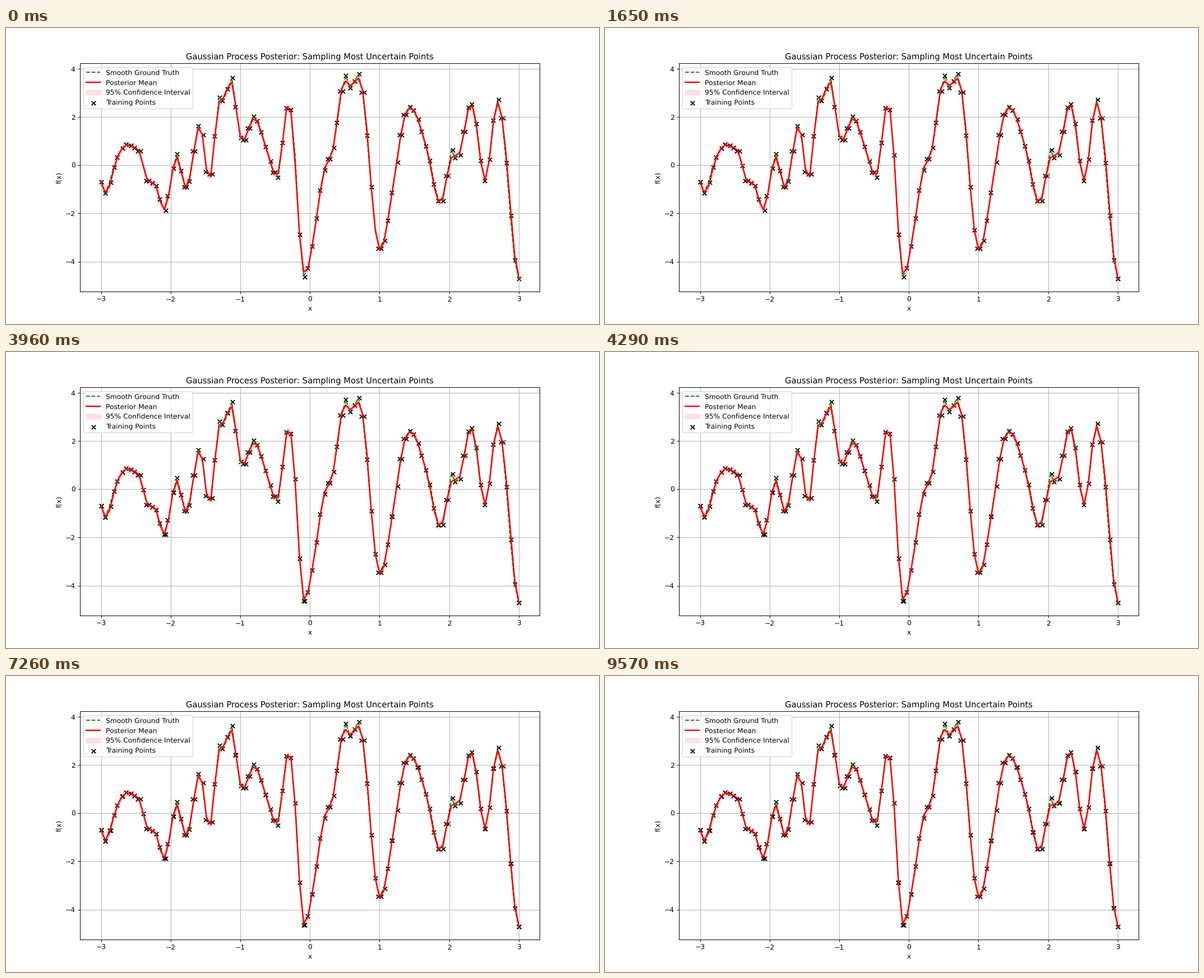
These frames come from a looping animation (1058x529 px, 9900 ms). A matplotlib script:

```python
import numpy as np
import matplotlib.pyplot as plt
from matplotlib.animation import FuncAnimation

FRAMES, INTERVAL = 30, 330
LENGTH, NOISE = 0.1, 0.01
COUNT = 100
GRID = np.linspace(-3, 3, COUNT)

# Turning points of the ground truth: grid step, value
KNOTS = np.array([
    (0, -0.69), (1, -1.15), (3, -0.08), (6, 0.86), (9, 0.60), (11, -0.63),
    (13, -0.84), (15, -1.88), (18, 0.47), (20, -0.90), (21, -0.67),
    (23, 1.64), (24, 1.26), (25, -0.28), (26, -0.37), (28, 2.83),
    (29, 2.69), (31, 3.63), (33, 1.14), (34, 1.06), (36, 2.03),
    (42, -0.49), (44, 2.38), (45, 2.30), (48, -4.64), (53, -0.19),
    (55, 0.73), (58, 3.72), (59, 3.21), (61, 3.79), (66, -3.45),
    (73, 2.43), (78, 0.19), (80, -1.47), (81, -1.47), (83, 0.63),
    (84, 0.31), (85, 0.43), (87, 2.41), (88, 2.55), (91, -0.63),
    (94, 2.73), (99, -4.71)])

# Grid steps with no known point at first, and those with one on each side
GAPS = {10, 46, 65}
PAIRS = {9, 11, 20, 22, 26, 34, 35, 41, 54, 57, 62, 66, 71, 72, 82, 86, 95}


def monotone_curve(x, kx, ky):
    """Cubic curve through the knots that is flat at each extremum."""
    h = np.diff(kx)
    d = np.diff(ky) / h
    slope = np.zeros(len(kx))
    slope[1:-1] = 2 * np.maximum(d[:-1] * d[1:], 0) / (d[:-1] + d[1:])
    i = np.clip(np.searchsorted(kx, x, side="right") - 1, 0, len(h) - 1)
    t = (x - kx[i]) / h[i]
    bend = slope[i] * (1 - t) - slope[i + 1] * t
    return (ky[i] + (ky[i + 1] - ky[i]) * t * t * (3 - 2 * t)
            + h[i] * t * (1 - t) * bend)


def kernel(a, b):
    return np.exp(-0.5 * ((a[:, None] - b[None, :]) / LENGTH) ** 2)


def position(steps):
    return -3 + steps * (GRID[1] - GRID[0])


def posterior(steps):
    x = position(steps)
    y = TRUTH[np.rint(steps).astype(int)]
    gain = np.linalg.solve(kernel(x, x) + NOISE * np.eye(len(x)),
                           kernel(x, GRID)).T
    var = 1 - np.sum(gain * kernel(GRID, x), axis=1)
    return x, y, gain @ y, np.sqrt(np.maximum(var, 0))


def first_points():
    jitter = np.random.default_rng(4).normal(0.05, 0.13, COUNT).clip(-0.4, 0.4)
    jitter[[0, -1]] = 0
    steps = []
    for k in range(COUNT):
        if k in PAIRS:
            steps += [k - 0.3, k + 0.3]
        elif k not in GAPS:
            steps.append(k + jitter[k])
    return np.array(steps)


def sample_history():
    """Add the most uncertain grid point before each new frame."""
    steps = first_points()
    history = [posterior(steps)]
    while len(history) < FRAMES:
        steps = np.append(steps, np.argmax(history[-1][3]))
        history.append(posterior(steps))
    return history


TRUTH = monotone_curve(np.arange(COUNT), KNOTS[:, 0], KNOTS[:, 1])
HISTORY = sample_history()

plt.rcParams["text.hinting"] = "none"
fig, ax = plt.subplots(figsize=(12, 6), dpi=1058 / 12)


def draw(i):
    x, y, mean, std = HISTORY[i]
    ax.clear()
    ax.plot(GRID, TRUTH, "g--", label="Smooth Ground Truth")
    ax.plot(GRID, mean, "r", lw=2, label="Posterior Mean")
    ax.fill_between(GRID, mean - 1.96 * std, mean + 1.96 * std,
                    color="pink", alpha=0.5, label="95% Confidence Interval")
    ax.scatter(x, y, c="black", marker="x", label="Training Points")
    ax.set_xlim(-3.3, 3.3)
    ax.set_ylim(-5.238, 4.229)
    ax.set_title("Gaussian Process Posterior: Sampling Most Uncertain Points")
    ax.set_xlabel("x")
    ax.set_ylabel("f(x)")
    ax.legend(loc="upper left")
    ax.grid(True)
    return []


anim = FuncAnimation(fig, draw, frames=FRAMES, interval=INTERVAL,
                     repeat=True, repeat_delay=0)
plt.show()
```
